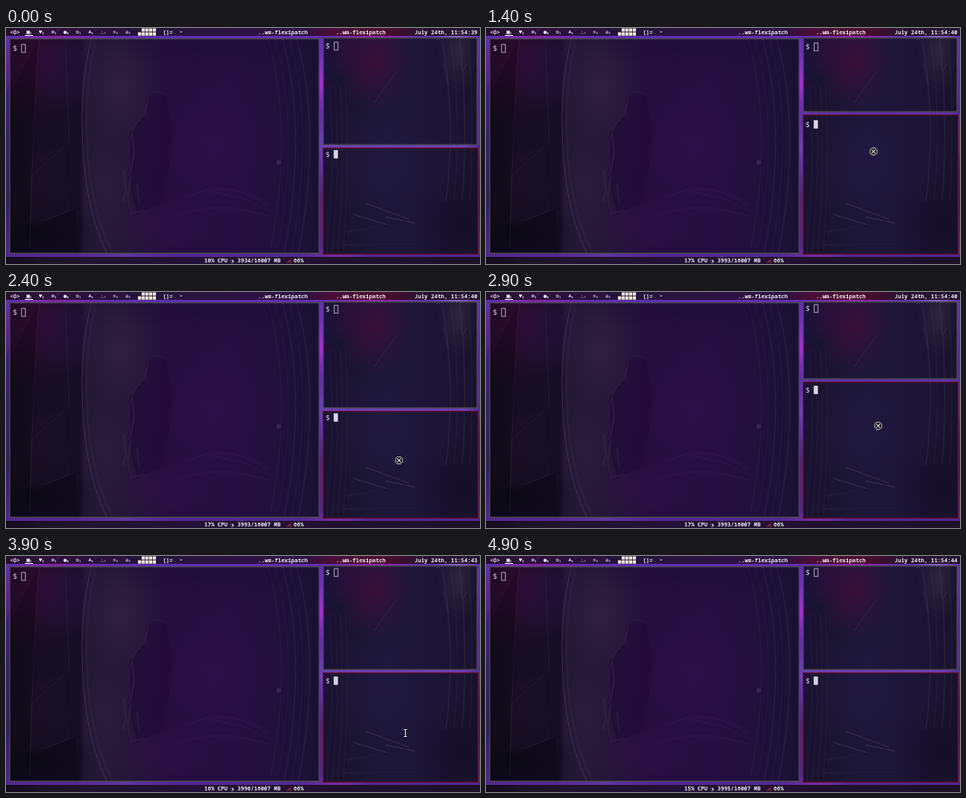
An HTML page with a canvas that plays this animation: 600 px wide and 300 px high, repeating every 5 s.

```html
<!DOCTYPE html>
<html lang="en">
<head>
<meta charset="utf-8">
<title>Tiling desktop</title>
<style>
html, body { margin: 0; width: 100%; height: 100%; overflow: hidden; background: #140d20; }
canvas { display: block; width: 600px; height: 300px; }
</style>
</head>
<body>
<canvas id="stage" width="600" height="300"></canvas>
<script>
const W = 600, H = 300, LOOP = 5000, STEP = 50;
const ctx = document.getElementById('stage').getContext('2d');
const MONO = '"Noto Sans Mono", "DejaVu Sans Mono", monospace';
const SYMBOL = '"DejaVu Sans", sans-serif';
const CELL = 11.33;

function layer(paint) {
  const c = document.createElement('canvas');
  c.width = W;
  c.height = H;
  paint(c.getContext('2d'));
  return c;
}

// Gradient from [position, colour] pairs, positions in pixels
function ramp(g, vertical, stops) {
  const size = vertical ? H : W;
  const grad = vertical ? g.createLinearGradient(0, 0, 0, H) : g.createLinearGradient(0, 0, W, 0);
  for (const [p, col] of stops) grad.addColorStop(p / size, col);
  return grad;
}

function glow(g, x, y, rx, ry, rgb, a) {
  g.save();
  g.translate(x, y);
  g.scale(rx, ry);
  const grad = g.createRadialGradient(0, 0, 0, 0, 0, 1);
  grad.addColorStop(0, `rgba(${rgb},${a})`);
  grad.addColorStop(0.5, `rgba(${rgb},${a * 0.5})`);
  grad.addColorStop(1, `rgba(${rgb},0)`);
  g.fillStyle = grad;
  g.fillRect(-1, -1, 2, 2);
  g.restore();
}

function curve(g, path, color, width = 1) {
  g.strokeStyle = color;
  g.lineWidth = width;
  g.stroke(new Path2D(path));
}

function shape(g, path, color) {
  g.fillStyle = color;
  g.fill(new Path2D(path));
}

// Wallpaper as it shows through the terminals
const dim = layer(g => {
  g.fillStyle = ramp(g, false, [[0, '#120b1b'], [40, '#160e22'], [94, '#160f26'], [100, '#221734'],
    [150, '#251737'], [200, '#250e3d'], [290, '#260f40'], [345, '#200f3b'], [395, '#181232'],
    [425, '#19132f'], [480, '#1d173a'], [545, '#1c1537'], [600, '#171229']]);
  g.fillRect(0, 0, W, H);
  glow(g, 40, 40, 70, 85, '70,8,62', 0.55);
  glow(g, 75, 50, 40, 60, '35,20,80', 0.4);
  glow(g, 50, 260, 70, 60, '12,9,22', 0.7);
  glow(g, 145, 75, 55, 75, '62,44,74', 0.45);
  glow(g, 125, 200, 38, 100, '48,38,66', 0.45);
  glow(g, 260, 150, 100, 90, '52,14,80', 0.4);
  glow(g, 200, 250, 70, 45, '60,16,80', 0.35);
  glow(g, 270, 20, 130, 40, '24,10,50', 0.4);
  glow(g, 465, 40, 50, 65, '82,8,60', 0.55);
  glow(g, 425, 25, 28, 40, '54,12,74', 0.5);
  glow(g, 572, 30, 26, 50, '70,66,80', 0.4);
  glow(g, 470, 170, 70, 70, '36,26,72', 0.5);
  glow(g, 570, 250, 60, 70, '18,12,34', 0.6);

  shape(g, 'M40 14L28 287L4 287L4 90Z', 'rgba(10,7,18,.3)');
  shape(g, 'M30 165L74 150L82 235L30 250Z', 'rgba(40,26,52,.22)');
  shape(g, 'M5 262Q25 238 50 246L88 230L92 287L5 287Z', 'rgba(10,8,20,.45)');
  curve(g, 'M42 14Q34 120 30 280M75 14L80 150M30 190L74 150M34 250L85 231', 'rgba(80,60,100,.22)');
  curve(g, 'M108 13Q92 80 97 150Q102 235 128 287', 'rgba(92,78,108,.45)');
  curve(g, 'M114 13Q98 80 103 150Q107 230 135 287', 'rgba(80,60,95,.16)', 3);

  // Standing figure
  shape(g, 'M178 90Q185 78 198 82Q207 88 204 102L212 125L206 180L196 222L166 238L160 215L155 180L156 140Q162 122 178 110Z',
    'rgba(32,9,56,.55)');
  curve(g, 'M204 86Q190 76 180 88Q180 106 164 122Q154 142 156 170L158 190L154 215L158 236L176 232',
    'rgba(78,52,92,.35)');
  curve(g, 'M160 135L162 160L158 182M149 180L152 208L148 220M166 198L168 222', 'rgba(88,66,100,.3)', 1.5);
  curve(g, 'M230 215Q280 190 330 225M220 238Q270 218 335 240M250 205L310 220', 'rgba(72,30,95,.25)', 2);

  for (let i = 0; i < 5; i++) {
    const x = 350 + i * 9;
    curve(g, `M${x - 18} 14Q${x + 14} 130 ${x - 16} 286`, `rgba(70,58,100,${0.14 + i * 0.025})`, i % 2 ? 1 : 2);
  }
  glow(g, 345, 171, 4, 4, '95,75,130', 0.6);

  for (let i = 0; i < 4; i++) {
    curve(g, `M${409 + i * 7} 70Q${418 + i * 6} 170 ${406 + i * 7} 286`, 'rgba(72,64,102,.2)');
    curve(g, `M${552 + i * 11} 14Q${570 + i * 8} 120 ${557 + i * 10} 220`, 'rgba(80,70,106,.2)', i % 2 ? 1 : 2);
  }
  curve(g, 'M494 55L466 95M554 45L560 72M578 55L583 45', 'rgba(88,82,100,.3)');
  curve(g, 'M456 223L510 243M440 237L482 250M480 240L518 248', 'rgba(105,85,112,.4)');
  curve(g, 'M425 276L520 274M430 260L470 252', 'rgba(65,55,90,.25)');
});

// Brighter wallpaper visible between windows, plus both bars
const bright = layer(g => {
  g.fillStyle = ramp(g, true, [[0, '#5e2ba0'], [20, '#6632b4'], [90, '#542a96'], [150, '#6a40b4'],
    [220, '#3d2474'], [300, '#542a92']]);
  g.fillRect(0, 0, W, H);
  glow(g, 0, 150, 25, 150, '30,18,64', 0.75);
  glow(g, 0, 45, 18, 40, '125,30,140', 0.6);
  glow(g, 70, 11, 65, 20, '150,35,160', 0.6);
  glow(g, 210, 11, 90, 15, '85,48,185', 0.6);
  glow(g, 399, 70, 20, 45, '190,45,225', 0.85);
  glow(g, 465, 11, 55, 18, '160,30,150', 0.7);
  glow(g, 570, 11, 28, 18, '160,130,200', 0.65);
  glow(g, 600, 180, 20, 100, '45,25,90', 0.6);
  glow(g, 399, 235, 16, 50, '120,35,90', 0.6);
  glow(g, 150, 289, 65, 14, '110,70,165', 0.5);
  glow(g, 420, 289, 45, 14, '150,50,165', 0.6);
  g.fillStyle = ramp(g, false, [[0, '#24102e'], [60, '#30103e'], [130, '#25123c'], [260, '#27143f'],
    [380, '#2d1045'], [410, '#490d38'], [475, '#500c30'], [525, '#28102c'], [600, '#241630']]);
  g.fillRect(0, 0, W, 10);
  g.fillStyle = ramp(g, false, [[0, '#150d1e'], [100, '#21152f'], [230, '#241038'], [400, '#221031'], [600, '#1b1027']]);
  g.fillRect(0, 291, W, 9);
});

function text(s, x, y, size = 7, color = '#f0e8f2', weight = 600, font = MONO) {
  ctx.font = `${weight} ${size}px ${font}`;
  ctx.fillStyle = color;
  ctx.fillText(s, x, y);
}

function pane(x, y, w, h, border) {
  ctx.drawImage(dim, x, y, w, h, x, y, w, h);
  ctx.strokeStyle = border;
  ctx.lineWidth = 1.4;
  ctx.strokeRect(x + 0.7, y + 0.7, w - 1.4, h - 1.4);
}

function prompt(x, y, focused) {
  text('$', x, y + 3.6, 9.4, '#c9c3d2', 400);
  if (focused) {
    ctx.fillStyle = '#d6d3e6';
    ctx.fillRect(x + 10.4, y - 4.8, 5.4, 10.6);
  } else {
    ctx.strokeStyle = '#b9b3c4';
    ctx.lineWidth = 0.9;
    ctx.strokeRect(x + 11, y - 4.5, 4.8, 10);
  }
}

// Terminals centre their whole rows, so the prompt shifts with the height
const rowY = (top, h) => Math.round(top + 7.5 + (h % CELL) / 2);

// time, divider, pointer x, pointer y
const drag = [
  [300, 152, 497, 213], [850, 152, 493, 209], [1410, 110, 490, 157], [1980, 180.5, 497, 249],
  [2880, 114, 496, 170], [3700, 148, 505, 225], [4300, 148, 506, 225]
];

function at(t, k) {
  if (t <= drag[0][0]) return drag[0][k];
  for (let i = 1; i < drag.length; i++) {
    const a = drag[i - 1], b = drag[i];
    if (t < b[0]) {
      const p = (t - a[0]) / (b[0] - a[0]);
      return a[k] + (b[k] - a[k]) * (0.5 - Math.cos(Math.PI * p) / 2);
    }
  }
  return drag[drag.length - 1][k];
}

const status = [[4850, 44, 15, 3995], [3850, 43, 16, 3996], [850, 40, 17, 3993], [0, 39, 10, 3934]];

function bars(t) {
  const [, sec, cpu, mem] = status.find(s => t >= s[0]);
  text('<O>', 5, 7.5);
  [...'■♥❖●✿♣△❀◉'].forEach((c, i) => {
    const color = i < 4 ? '#eee4f0' : i > 5 ? '#b88fae' : '#cbbad2';
    const x = 25.5 + i * 15.65;
    text(c, x, 7, 5.5, color, 400, SYMBOL);
    text(i + 1, x + 4.5, 8, 3.8, color, 600);
  });
  ctx.fillStyle = '#fff';
  ctx.fillRect(24, 9, 10, 1);
  ctx.fillStyle = '#f4efdf';
  for (let i = 0; i < 5; i++) {
    const x = 167 + i * 4.7;
    if (i) ctx.fillRect(x, 0.5, 4, 4);
    ctx.fillRect(x, 5.5, 4, 4.2);
  }
  text('[]=', 198.5, 7.5);
  text('~', 219.5, 7.5);
  text('..wm-flexipatch', 319, 7.5);
  text('..wm-flexipatch', 417.5, 7.5);
  text(`July 24th, 11:54:${sec}`, 517, 7.5);

  text(`${cpu}% CPU`, 251, 298);
  text('◑', 284, 297.6, 5.5, '#d9b8c8', 400, SYMBOL);
  text(`${mem}/16007 MB`, 293, 298);
  ctx.fillStyle = '#a02c50';
  for (let i = 0; i < 3; i++) ctx.fillRect(355.5 + i * 2, 297 - i * 1.6, 1, 1.5 + i * 1.6);
  text('66%', 364, 298);
}

function pointer(t) {
  if (t < 300 || t >= 4300) return;
  ctx.save();
  ctx.translate(Math.round(at(t, 2)) + 0.5, Math.round(at(t, 3)));
  if (t >= 850 && t < 3850) {
    ctx.fillStyle = '#08060c';
    ctx.beginPath();
    ctx.roundRect(-5, -5, 10, 10, 2.5);
    ctx.fill();
    curve(ctx, 'M-2.6 -4.3H2.6M-2.6 4.3H2.6M-4.3 -2.6V2.6M4.3 -2.6V2.6M-4.3 -2.6L-2.6 -4.3M4.3 -2.6L2.6 -4.3M-4.3 2.6L-2.6 4.3M4.3 2.6L2.6 4.3', '#e8e6ec', 0.9);
    curve(ctx, 'M-2.6 -2.6L2.6 2.6M2.6 -2.6L-2.6 2.6', '#e8e6ec', 1.1);
  } else {
    const beam = 'M-2 -4.5H2M0 -4.5V4.5M-2 4.5H2';
    curve(ctx, beam, '#0a0810', 2.6);
    curve(ctx, beam, '#e6e3ea', 1.2);
  }
  ctx.restore();
}

function draw(t) {
  const top = Math.round(at(t, 1));
  const upper = top - 3 - 12, lower = 288 - top;
  ctx.drawImage(bright, 0, 0);
  pane(4, 13, 393, 274, '#4b4753');
  pane(401, 12, 196, upper, '#4b4753');
  pane(401, top, 197, lower, '#5a0e2a');
  prompt(8.7, 25.5, false);
  prompt(404.4, rowY(12, upper + 3) + 0.5, false);
  prompt(404.4, rowY(top, lower), true);
  bars(t);
  pointer(t);
}

const start = performance.now();
function tick() {
  const t = (performance.now() - start) % LOOP;
  draw(Math.floor(t / STEP) * STEP);
  requestAnimationFrame(tick);
}
tick();
</script>
</body>
</html>
```
